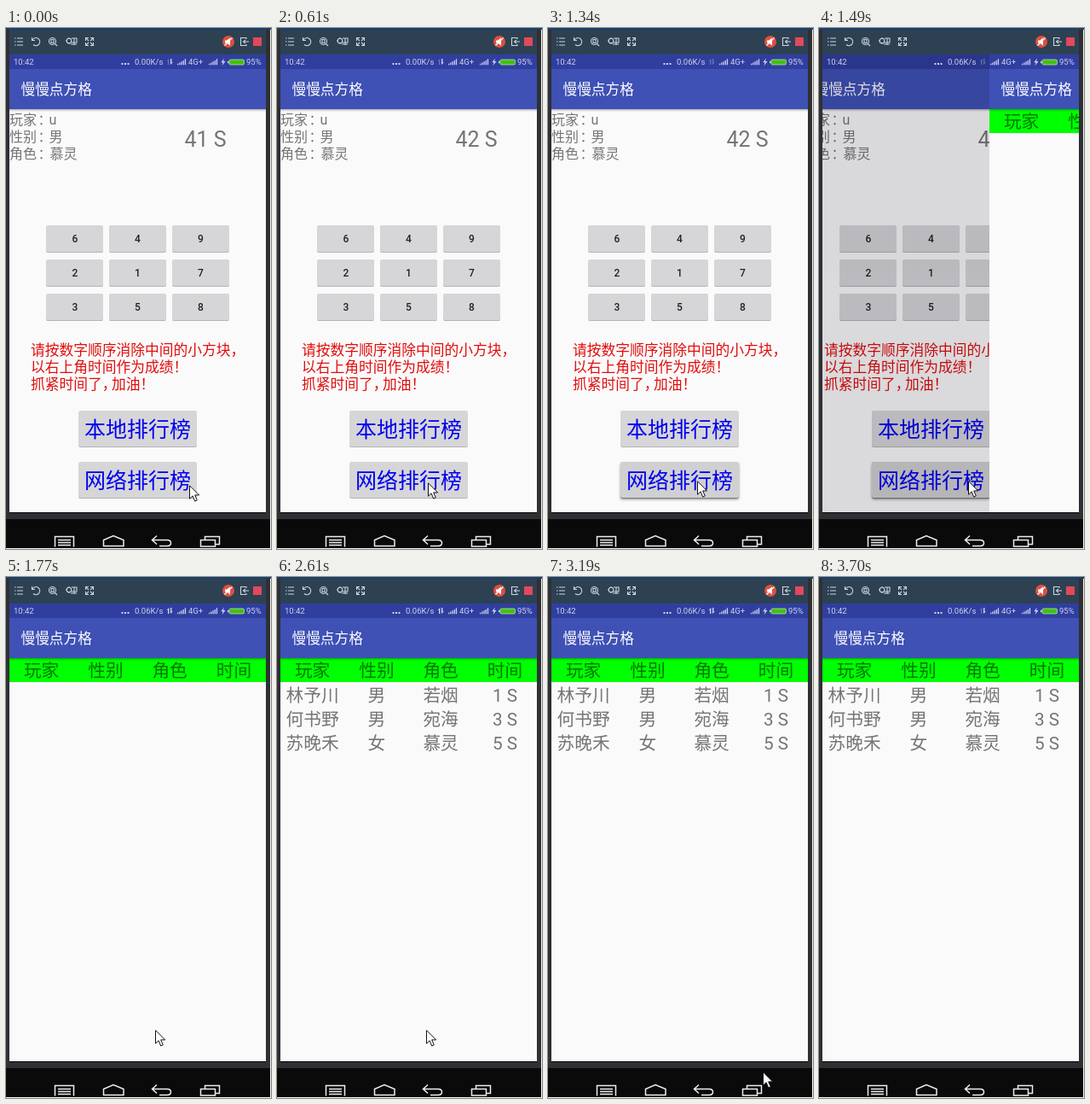
Write an HTML page that moves like this. It is 311x610 px and loops after 3.8 s.

```html
<!DOCTYPE html>
<html lang="zh-CN">
<head>
<meta charset="utf-8">
<title>数字方块</title>
<style>
html, body { margin: 0; width: 100%; height: 100%; overflow: hidden; background: #2f3034; }
svg { display: block; width: 311px; height: 610px; }
text { font-family: Roboto, "Noto Sans CJK SC", "Noto Sans CJK", sans-serif; white-space: pre; }
.info { font-size: 16px; fill: #757575; }
.title { font-size: 16.7px; fill: #fff; }
.timer { font-size: 25px; fill: #757575; }
.key { font-size: 12px; font-weight: 500; fill: #212121; text-anchor: middle; }
.tip { font-size: 16.75px; fill: #e20c0c; }
.rank { font-size: 25px; fill: #0000f0; text-anchor: middle; }
.head { font-size: 20.7px; fill: #007500; text-anchor: middle; }
.row { font-size: 20.7px; fill: #757575; text-anchor: middle; }
.status { font-size: 9.5px; fill: #cdd2ee; }
.tool, .nav { fill: none; stroke: #cbd5dc; stroke-width: 1.1; }
.nav { stroke: #eee; stroke-width: 1.5; }
.button { fill: #d6d6d8; filter: drop-shadow(0 1px .7px rgba(0, 0, 0, .28)); }
.raised { fill: #d0d0d2; filter: drop-shadow(0 2px 1.5px rgba(0, 0, 0, .4)); }

/* Every change is a hard cut on a 3.8 s loop. */
.a { animation: 3.8s step-end infinite; }
.before-tick { animation-name: beforeTick; }
.after-tick { animation-name: afterTick; }
.idle { animation-name: idle; }
.busy { animation-name: busy; }
.press { animation-name: press; }
.home { animation-name: home; }
.dim { animation-name: dim; }
.board { animation-name: board; }
.rows { animation-name: rows; }
.up { animation-name: up; }
.down { animation-name: down; }
.cursor { animation-name: cursor; }

@keyframes beforeTick { 0% { opacity: 1 } 12.105%, to { opacity: 0 } }
@keyframes afterTick { 0% { opacity: 0 } 12.105%, to { opacity: 1 } }
@keyframes idle { 0% { opacity: 1 } 19.999%, to { opacity: 0 } }
@keyframes busy { 0% { opacity: 0 } 19.999%, to { opacity: 1 } }
@keyframes press { 0% { opacity: 0 } 35.263%, to { opacity: 1 } }
@keyframes home {
  0% { transform: none }
  39.21% { transform: translateX(-23px) }
  42.368% { transform: translateX(-61px) }
  46.578%, to { transform: translateX(-75px) }
}
@keyframes dim { 0% { opacity: 0 } 39.21% { opacity: .13 } 42.368%, to { opacity: .32 } }
@keyframes board {
  0% { transform: translateX(301px) }
  39.21% { transform: translateX(196px) }
  42.368% { transform: translateX(36px) }
  46.578%, to { transform: none }
}
@keyframes rows { 0% { opacity: 0 } 68.684%, to { opacity: 1 } }
@keyframes up { 0% { opacity: .35 } 42.368% { opacity: 1 } 97.368%, to { opacity: .35 } }
@keyframes down { 0% { opacity: 1 } 19.999% { opacity: .35 } 42.368%, to { opacity: 1 } }
@keyframes cursor {
  0% { transform: translate(215px, 535px) }
  8.157% { transform: translate(207px, 535px) }
  12.105% { transform: translate(189px, 534px) }
  16.052% { transform: translate(177px, 532px) }
  19.999% { transform: translate(175px, 530px) }
  72.631% { transform: translate(206px, 547px) }
  76.052% { transform: translate(233px, 564px) }
  79.999% { transform: translate(237px, 565px) }
  83.947% { transform: translate(252px, 579px) }
  87.105% { transform: translate(271px, 598px) }
  90.263%, to { transform: translate(290px, 620px) }
}
</style>
</head>
<body>
<svg viewBox="0 0 311 610">
  <defs>
    <clipPath id="screen"><path d="M4 31H305V567H4z"/></clipPath>
    <linearGradient id="shade" x2="0" y2="1">
      <stop stop-opacity=".28"/><stop offset="1" stop-opacity="0"/>
    </linearGradient>
    <rect id="key" class="button" width="67" height="31" rx="2"/>
    <g id="keys">
      <use href="#key" x="47"/><use href="#key" x="121"/><use href="#key" x="195"/>
    </g>
    <rect id="wide" width="139" height="42" rx="2.5"/>
    <g id="page">
      <path d="M4 31H305V567H4z" fill="#fafafa"/>
      <path d="M4 31H305V48H4z" fill="#303f9f"/>
      <path d="M4 48H305V95H4z" fill="#3f51b5"/>
      <text class="title" x="17.5" y="78">慢慢点方格</text>
    </g>
    <rect id="shadow" x="4" y="95" width="301" height="3" fill="url(#shade)"/>
    <path id="bars" d="M0 7V5.5H1.3V7zM2.2 7V4.3H3.5V7zM4.4 7V3H5.7V7zM6.6 7V1.6H7.9V7zM8.8 7V0H10.1V7z"/>
  </defs>

  <!-- window frame and toolbar -->
  <rect width="311" height="610" fill="#2f3034"/>
  <rect width="311" height="2" fill="#17406c"/>
  <path d="M4 2H305V31H4z" fill="#2d4153"/>
  <path d="M0 575H311V610H0z" fill="#0a0a0a"/>
  <path d="M4 567H305V568H4z" fill="#000"/>
  <path d="M310 2H311V610H310zM0 609H311V610H0z" fill="#f4f4f4"/>
  <g class="tool">
    <path d="M10 12H11.5M13 12H20M10 16H11.5M13 16H20M10 20H11.5M13 20H20"/>
    <path d="M30.5 11V14.5H34M31 14A4.6 4.6 0 1 1 32 19.5"/>
    <circle cx="54.5" cy="15.5" r="4"/><path d="M57.5 18.5L60 21M53 13.5V17.5H56V13.5z"/>
    <circle cx="74" cy="15" r="2.8"/><path d="M70 15H71M74 11V12M74 18V19M77 12H83V17H77M80 12V20M76 19H83"/>
    <path d="M93.5 15V11.5H97M99 11.5H102.5V15M102.5 17V20.5H99M97 20.5H93.5V17M94 12L97 15M102 12L99 15M102 20L99 17M94 20L97 17"/>
    <path d="M282 13V11.5H275.5V20.5H282V19M285 16H278.5M281 13.8L278.5 16 281 18.2"/>
  </g>
  <circle cx="261" cy="16" r="7" fill="#e0503e"/>
  <path d="M257 14.5H259L263 11.5V20.5L259 17.5H257z" fill="#fff"/>
  <path d="M256.5 20.5L265.5 11.5" stroke="#fff" stroke-width="1.2"/>
  <rect x="290" y="11" width="10" height="10" fill="#e2495b"/>

  <g clip-path="url(#screen)">
    <g class="a home">
      <use href="#page"/>
      <use href="#shadow"/>
      <g class="info">
        <text x="4" y="113">玩家</text><text x="37.5" y="113">：</text><text x="50.5" y="113">u</text>
        <text x="4" y="133">性别</text><text x="37.5" y="133">：</text><text x="50.5" y="133">男</text>
        <text x="4" y="153">角色</text><text x="37.5" y="153">：</text><text x="51.5" y="153">慕灵</text>
      </g>
      <g class="timer">
        <text class="a before-tick" x="209.5" y="139">41 S</text>
        <text class="a after-tick" x="209.5" y="139">42 S</text>
      </g>
      <use href="#keys" y="231"/><use href="#keys" y="271"/><use href="#keys" y="311"/>
      <g class="key">
        <text x="81 154.5 228.3" y="251">649</text>
        <text x="81 154.5 228.3" y="291">217</text>
        <text x="81 154.5 228.3" y="331">358</text>
      </g>
      <g class="tip">
        <text x="29" y="383">请按数字顺序消除中间的小方块，</text>
        <text x="29" y="403">以右上角时间作为成绩！</text>
        <text x="29" y="423">抓紧时间了，</text><text x="124" y="423">加油！</text>
      </g>
      <use href="#wide" class="button" x="85" y="448"/>
      <use href="#wide" class="button" x="85" y="508"/>
      <g class="a press"><use href="#wide" class="raised" x="85" y="508"/></g>
      <g class="rank">
        <text x="154.5" y="478.5">本地排行榜</text>
        <text x="154.5" y="538.5">网络排行榜</text>
      </g>
    </g>
    <path class="a dim" d="M4 31H305V567H4z" fill="#080010"/>

    <g class="a board">
      <use href="#page"/>
      <path d="M4 95H305V123H4z" fill="#0f0"/>
      <use href="#shadow"/>
      <g class="head">
        <text x="41.6" y="117">玩家</text><text x="116.9" y="117">性别</text>
        <text x="192.1" y="117">角色</text><text x="267.4" y="117">时间</text>
      </g>
      <g class="row"><g class="a rows">
        <text x="41.6" y="145.5">林予川</text><text x="116.9" y="145.5">男</text>
        <text x="192.1" y="145.5">若烟</text><text x="267.4" y="145.5">1 S</text>
        <text x="41.6" y="173.7">何书野</text><text x="116.9" y="173.7">男</text>
        <text x="192.1" y="173.7">宛海</text><text x="267.4" y="173.7">3 S</text>
        <text x="41.6" y="202">苏晚禾</text><text x="116.9" y="202">女</text>
        <text x="192.1" y="202">慕灵</text><text x="267.4" y="202">5 S</text>
      </g></g>
    </g>
  </g>

  <!-- system status bar -->
  <g class="status">
    <text x="9" y="43">10:42</text>
    <path d="M135.5 41h2v2h-2zM139 41h2v2h-2zM142.5 41h2v2h-2z"/>
    <text class="a idle" x="151" y="43">0.00K/s</text>
    <text class="a busy" x="151" y="43">0.06K/s</text>
    <path class="a up" d="M190 43V38.8H188.6L191.4 36V43z"/>
    <path class="a down" d="M193 36V43L195.9 40.2H194.4V36z"/>
    <use href="#bars" x="201" y="36.3"/>
    <text x="214" y="43">4G+</text>
    <use href="#bars" x="238" y="36.3"/>
    <path d="M256 35.5L252.3 40.3H254.6L253.4 44.3 257.5 39H255z"/>
    <rect x="262" y="37" width="17.5" height="6" rx="1.5" fill="#43c010" stroke="#b9dcb4" stroke-width=".8"/>
    <path d="M260 38.8H261.6V41.2H260z"/>
    <text x="282" y="43">95%</text>
  </g>

  <!-- navigation keys -->
  <g class="nav">
    <path d="M57.5 607.5V595.5H79.5V607.5M61 599.5H76M61 602.5H76M61 605.5H76"/>
    <path d="M114.5 606.5V599.5L126 594.5 138 599.5V606.5z"/>
    <path d="M177 594.5L171.5 599.5 177 604.5M172 599.5H189Q193.5 599.5 193.5 603T189 606.5H180"/>
    <path d="M233.5 599V595.5H250.5V604.5H246M228.5 599.5H245.5V607H228.5z"/>
  </g>

  <path class="a cursor" d="M.5 .8V16.2L4.1 12.8 6.7 19 9.3 17.9 6.7 11.9H11.6z" fill="#fff" stroke="#111"/>
</svg>
</body>
</html>
```
